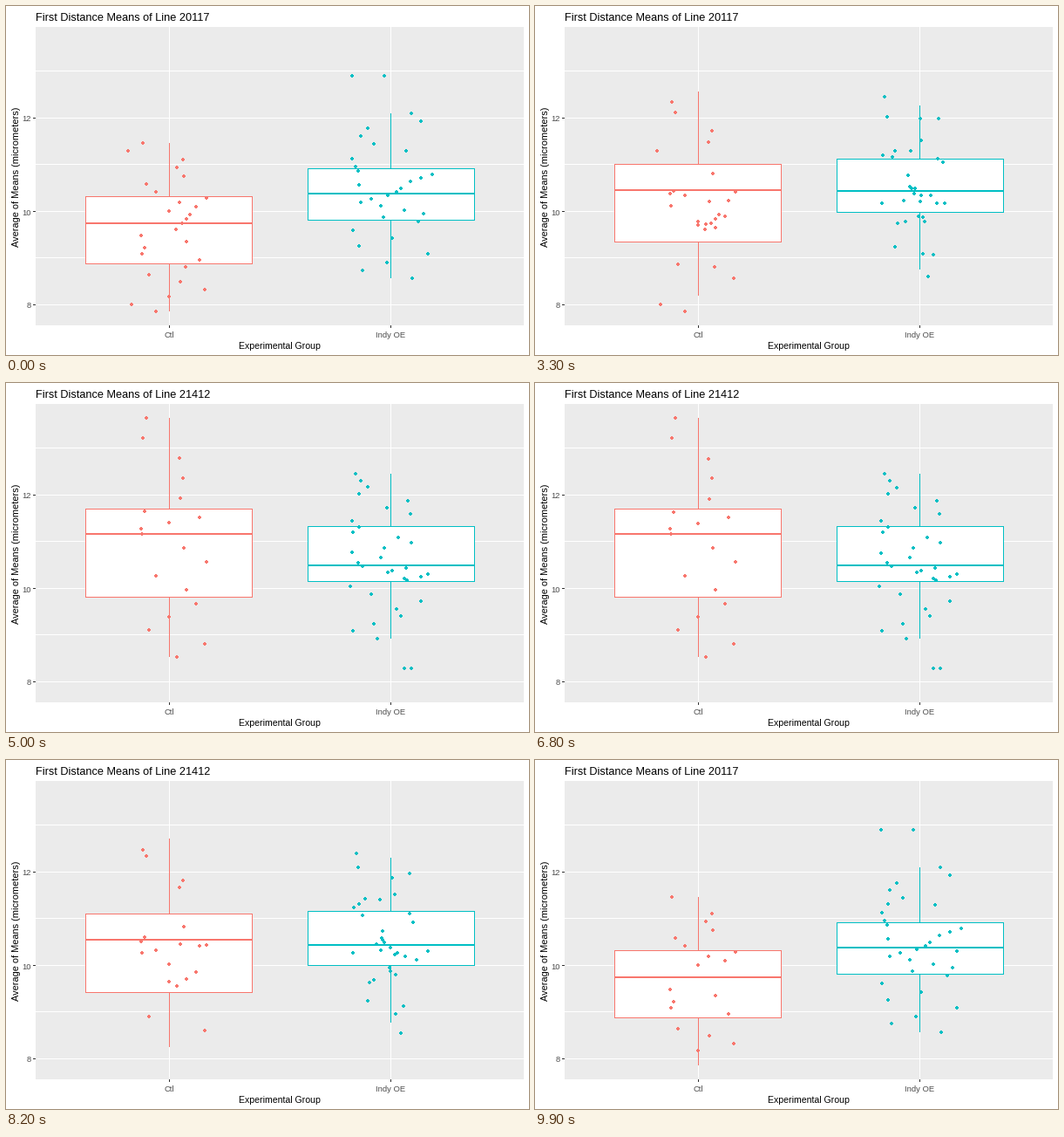
Write a matplotlib script that moves like this. It is 600x400 px and loops after 10 s.

```python
import numpy as np
import matplotlib.pyplot as plt
from matplotlib.animation import FuncAnimation
from matplotlib.collections import PolyCollection
from matplotlib.patches import Rectangle

W, H, DPI = 600, 400, 100
FRAMES, STEP_MS = 100, 100
LEAVE_A, REACH_B, LEAVE_B = 16, 50, 67
CORAL, TEAL = "#F8766D", "#00BFC4"
CTL_X, INDY_X = 187.5, 442

# Dots per group on the first line (A) and the second line (B)
CTL_NA, CTL_NB, INDY_NA, INDY_NB = 27, 19, 32, 34

# Whisker top, box top, median, box bottom, whisker bottom on each line
CTL_BOX = np.array([(157, 218, 249, 295, 350), (40, 144, 173, 245, 314)])
INDY_BOX = np.array([(123, 186, 215, 245, 312), (104, 164, 209, 227, 293)])

# Outline of a 4 px dot with its corners cut off
DOT = np.array([(-1, -2), (1, -2), (1, -1), (2, -1), (2, 1), (1, 1),
                (1, 2), (-1, 2), (-1, 1), (-2, 1), (-2, -1), (-1, -1)])

rng = np.random.default_rng(20117)
# One jitter sequence serves both lines, each consuming it group by group
jitter = rng.uniform(-48, 49, CTL_NA + INDY_NA)


def sample(center, first, n, stats, outliers=()):
    """Jittered dots whose heights follow the box plot's quartiles."""
    y = np.interp(np.linspace(0, 4, n - len(outliers)), range(5), stats)
    y = rng.permutation(np.append(y, outliers))
    return np.column_stack([center + jitter[first:first + n], y])


ctl_a = sample(CTL_X, 0, CTL_NA, CTL_BOX[0])
ctl_b = sample(CTL_X, 0, CTL_NB, CTL_BOX[1])
indy_a = sample(INDY_X, CTL_NA, INDY_NA, INDY_BOX[0], (80, 80))
indy_b = sample(INDY_X, CTL_NB, INDY_NB, INDY_BOX[1], (327, 327))

plt.rcParams["font.family"] = "Liberation Sans"
fig = plt.figure(figsize=(W / DPI, H / DPI), dpi=DPI, facecolor="white")
ax = fig.add_axes([0, 0, 1, 1])
ax.set(xlim=(0, W), ylim=(H, 0))
ax.axis("off")


def rect(x, y, w, h, color, z=1):
    return ax.add_patch(Rectangle((x, y), w, h, fc=color, ec="none", lw=0,
                                  antialiased=False, zorder=z))


def label(x, y, s, px, color="black", **kw):
    return ax.text(x, y, s, fontsize=px * 72 / DPI, color=color, **kw)


class Box:
    def __init__(self, x, mid, color, stats):
        self.stats = stats
        self.whisker = rect(mid, 0, 1, 1, color, 2)
        self.frame = rect(x, 0, 192, 1, color, 3)
        self.inside = rect(x + 1, 0, 190, 1, "white", 4)
        self.median = rect(x, 0, 192, 2, color, 5)

    def update(self, t):
        high, top, med, bottom, low = np.rint(mix(*self.stats, t))
        for part, y, h in ((self.whisker, high, low - high),
                           (self.frame, top, bottom - top + 1),
                           (self.inside, top + 1, bottom - top - 1),
                           (self.median, med - 1, 2)):
            part.set_y(y)
            part.set_height(h)


def mix(a, b, t):
    return a + (b - a) * t


def dots(color):
    return ax.add_collection(PolyCollection(
        [], facecolors=color, edgecolors="none", linewidths=0,
        antialiaseds=False, zorder=6), autolim=False)


def place(layer, a, b, t, on_a):
    """Move paired dots; unpaired ones stand still while their line is on."""
    n = min(len(a), len(b))
    rest = a[n:] if on_a else b[n:]
    pts = np.vstack([mix(a[:n], b[:n], t), rest])
    layer.set_verts([DOT + p for p in np.rint(pts)])


# Panel, grid and axes
rect(34, 24, 560, 342, "#EBEBEB", 0)
for k in range(6):
    rect(34, 74 + round(53.6 * k), 560, 1, "white")
for x, name in ((187, "Ctl"), (441, "Indy OE")):
    rect(x, 24, 1, 342, "white")
    rect(x, 366, 1, 3, "#333333")
    label(x + 0.5, 380, name, 9.4, "#4D4D4D", ha="center")
for k in range(3):
    y = 128 + 107 * k
    rect(31, y, 3, 1, "#333333")
    label(29, y + 4.5, str(12 - 2 * k), 9.4, "#4D4D4D", ha="right")
label(314, 393, "Experimental Group", 10.5, ha="center")
label(17, 195.5, "Average of Means (micrometers)", 11, rotation=90,
      ha="right", va="center")
title = label(34, 17, "", 12.8)

boxes = [Box(91, 187, CORAL, CTL_BOX), Box(346, 441, TEAL, INDY_BOX)]
ctl_dots, indy_dots = dots(CORAL), dots(TEAL)


def progress(i):
    """Linear share of the way from the first line to the second."""
    if i < REACH_B:
        return max(0, (i - LEAVE_A) / (REACH_B - LEAVE_A))
    return min(1, (FRAMES - i) / (FRAMES - LEAVE_B))


def draw(i):
    p = progress(i)
    t = (1 - np.cos(np.pi * p)) / 2
    title.set_text(f"First Distance Means of Line {21412 if p > 0.5 else 20117}")
    for box in boxes:
        box.update(t)
    place(ctl_dots, ctl_a, ctl_b, t, i < REACH_B)
    place(indy_dots, indy_a, indy_b, t, i < REACH_B)
    return []


anim = FuncAnimation(fig, draw, frames=FRAMES, interval=STEP_MS,
                     repeat=True, repeat_delay=0, blit=False)
plt.show()
```
